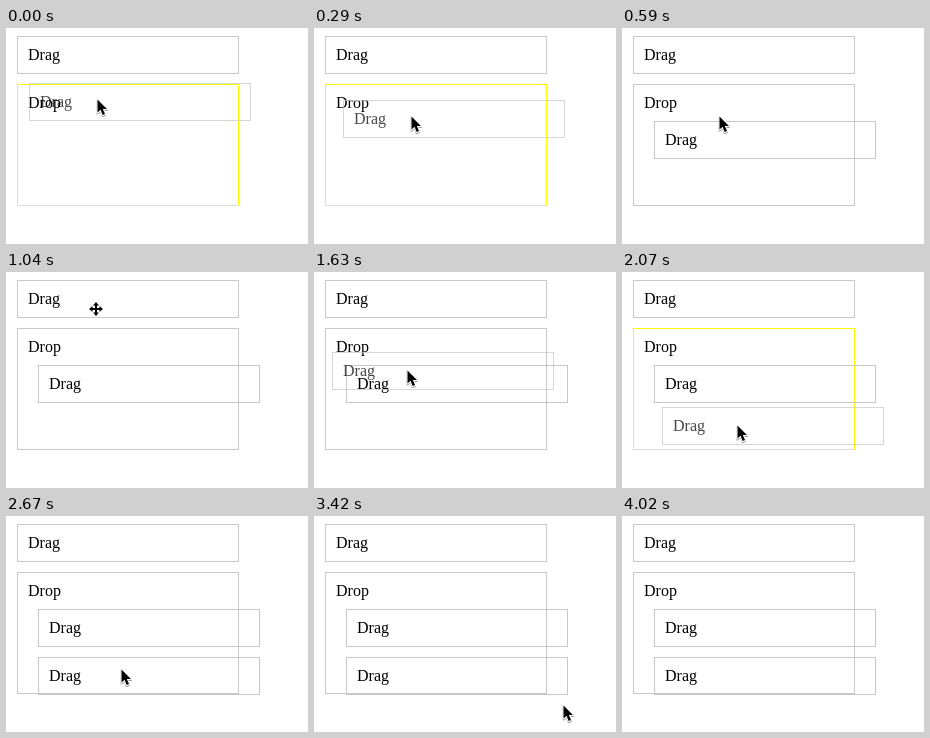
Animation of 302x216 px, one loop 4120 ms. Source, as an HTML page:

```html
<!DOCTYPE html>
<html lang="en">
<head>
<meta charset="utf-8">
<title>Drag and drop</title>
<style>
  html, body {
    margin: 0;
    width: 100%;
    height: 100%;
    overflow: hidden;
    background: #fff;
  }
  .stage {
    position: relative;
    width: 302px;
    height: 216px;
    overflow: hidden;
    font: 16px/15px "Liberation Serif", Times, serif;
    color: #000;
  }
  .box, .cursor {
    position: absolute;
    left: 0;
    top: 0;
  }
  .box {
    box-sizing: border-box;
    width: 222px;
    height: 38px;
    padding: 10px;
    border: 1px solid #c8c8c8;
  }
  .source { left: 11px; top: 8px; }
  .drop { left: 11px; top: 56px; height: 122px; }
  .first { left: 32px; top: 93px; }
  .second { left: 32px; top: 141px; }
  .ghost { opacity: .72; }

  .drop, .first, .second, .ghost, .cursor {
    animation: 4120ms step-end infinite;
  }
  .drop { animation-name: highlight; }
  .first { animation-name: show-first; }
  .second { animation-name: show-second; }
  .ghost { animation-name: drag; }
  .arrow { animation-name: point; }
  .move { animation-name: hover; }

  .cursor path {
    stroke: #fff;
    stroke-width: 2;
    stroke-linejoin: round;
    paint-order: stroke;
  }
  .arrow { filter: drop-shadow(0 1px .6px #0006); }

  @keyframes highlight {
    0%, 46.844% { border-color: #ff0 #ff0 #dcdcdc #dcdcdc; }
    14.32%, 64.805%, 100% { border-color: #c8c8c8; }
  }
  @keyframes show-first {
    0% { visibility: hidden; }
    10.679%, 100% { visibility: visible; }
  }
  @keyframes show-second {
    0% { visibility: hidden; }
    64.805%, 100% { visibility: visible; }
  }
  @keyframes drag {
    0% { visibility: visible; transform: translate(23px, 55px); }
    3.64% { visibility: visible; transform: translate(29px, 68px); }
    7.038% { visibility: visible; transform: translate(29px, 72px); }
    10.679% { visibility: hidden; transform: translate(29px, 72px); }
    39.563% { visibility: visible; transform: translate(18px, 80px); }
    43.203% { visibility: visible; transform: translate(30px, 107px); }
    46.844% { visibility: visible; transform: translate(38px, 126px); }
    50.242% { visibility: visible; transform: translate(40px, 135px); }
    61.165%, 100% { visibility: hidden; transform: translate(40px, 135px); }
  }
  @keyframes point {
    0% { visibility: visible; transform: translate(90px, 71px); }
    3.64% { visibility: visible; transform: translate(96px, 84px); }
    7.038% { visibility: visible; transform: translate(96px, 88px); }
    21.601% { visibility: visible; transform: translate(92px, 52px); }
    25.242% { visibility: hidden; transform: translate(92px, 52px); }
    39.563% { visibility: visible; transform: translate(92px, 98px); }
    43.203% { visibility: visible; transform: translate(104px, 125px); }
    46.844% { visibility: visible; transform: translate(112px, 144px); }
    50.242% { visibility: visible; transform: translate(114px, 153px); }
    79.368% { visibility: hidden; transform: translate(114px, 153px); }
    83.009% { visibility: visible; transform: translate(248px, 189px); }
    90.291%, 100% { visibility: hidden; transform: translate(248px, 189px); }
  }
  @keyframes hover {
    0% { visibility: hidden; transform: translate(83px, 30px); }
    25.242% { visibility: visible; transform: translate(83px, 30px); }
    28.883% { visibility: visible; transform: translate(82px, 21px); }
    32.524% { visibility: visible; transform: translate(81px, 21px); }
    39.563% { visibility: hidden; transform: translate(81px, 21px); }
    79.368% { visibility: visible; transform: translate(189px, 158px); }
    83.009%, 100% { visibility: hidden; transform: translate(189px, 158px); }
  }
</style>
</head>
<body>
<div class="stage">
  <div class="box source">Drag</div>
  <div class="box drop">Drop</div>
  <div class="box first">Drag</div>
  <div class="box second">Drag</div>
  <div class="box ghost">Drag</div>
  <svg class="cursor arrow" width="13" height="18" overflow="visible">
    <path d="M1.5 .5V13.5L4.5 10.7L6.7 16L9 15L6.8 9.9H11Z"/>
  </svg>
  <svg class="cursor move" width="14" height="14" overflow="visible">
    <path d="M7 0L10 3.5H8V6H10.5V4L14 7L10.5 10V8H8V10.5H10L7 14L4 10.5H6V8H3.5V10L0 7L3.5 4V6H6V3.5H4Z"/>
  </svg>
</div>
</body>
</html>
```
